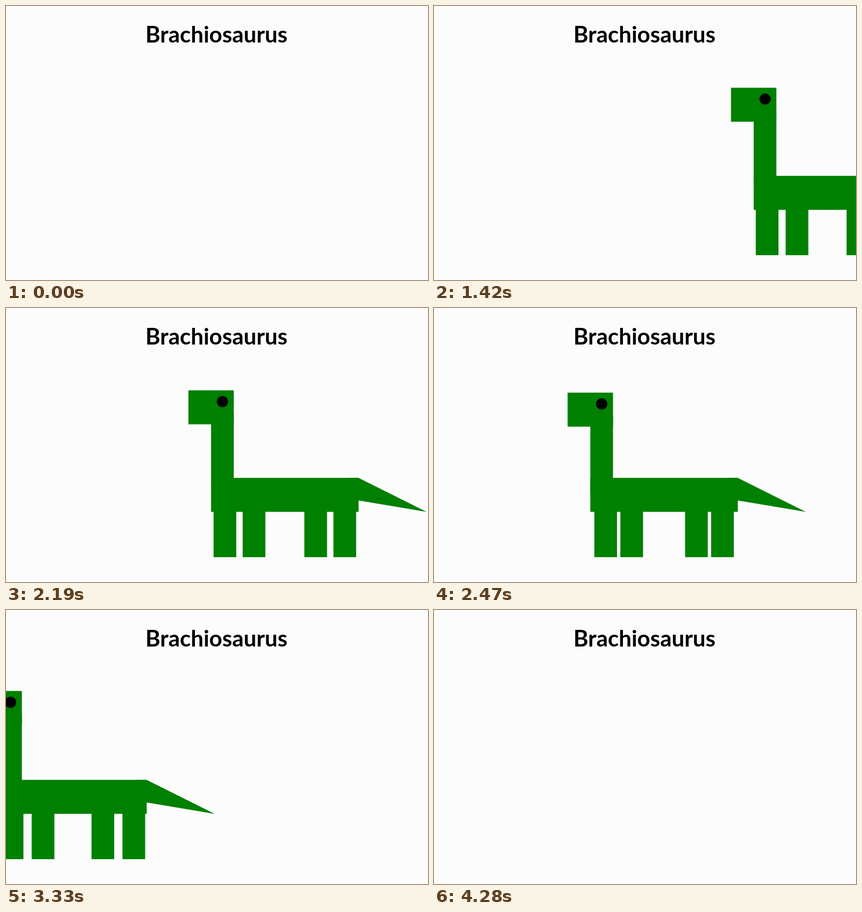
Write an HTML page with a canvas that moves like this. It is 784 px wide and 510 px high and loops after 4560 ms.

```html
<!DOCTYPE html>
<html lang="en">
<head>
<meta charset="utf-8">
<title>Brachiosaurus</title>
<style>
  html, body { margin: 0; width: 100%; height: 100%; overflow: hidden; background: #fcfcfc; }
  canvas { display: block; }
</style>
</head>
<body>
<canvas id="stage" width="784" height="510"></canvas>
<script>
const ctx = document.getElementById('stage').getContext('2d');
const LOOP = 4560;
const STEP = 95;   // the picture advances in steps of this many ms
const U = 21.08;   // body unit, all parts are multiples of it

// cubic-bezier(.42, 0, 1, 1), solved with Newton's method
function easeIn(p) {
  let s = p;
  for (let i = 0; i < 6; i++) {
    const err = ((-0.74 * s + 0.48) * s + 1.26) * s - p;
    s -= err / (1.26 + 0.96 * s - 2.22 * s * s + 0.001);
  }
  return s * s * (3 - 2 * s);
}

// Left edge of the head: one eased walk of five seconds, already under way at 0.
function walkX(t) {
  return 828 - 1374 * easeIn((t + 500) / 5000);
}

// Head bob and leg swing: 0 to 1 and back every 250 ms.
function gait(t) {
  const p = (t + 151) % 250 / 125;
  return p < 1 ? easeIn(p) : 1 - easeIn(p - 1);
}

function box(x, y, w, h) {
  ctx.fillRect(x, y, w * U, h * U);
}

function dinosaur(x, swing) {
  const head = (7 + swing / 2) * U;
  const stride = 0.8 + swing * U / 3;
  const body = x + 2 * U, back = 15 * U, rump = body + 13 * U;

  ctx.fillStyle = '#008000';
  box(x, head, 4, 3);
  box(body, head + 2 * U, 2, 7);
  box(body, back, 13, 3);
  for (const hip of [0, 8 * U]) {
    box(body + hip + stride, 17 * U, 2, 5);
    box(body + hip + 3 * U - stride, 17 * U, 2, 5);
  }

  // The tail starts inside the body so that no seam shows.
  ctx.beginPath();
  ctx.moveTo(rump - U, back);
  ctx.lineTo(rump, back);
  ctx.lineTo(rump + 6 * U, back + 3 * U);
  ctx.lineTo(rump, back + 2 * U);
  ctx.lineTo(rump - U, back + 2 * U);
  ctx.fill();

  ctx.fillStyle = '#000';
  ctx.beginPath();
  ctx.arc(x + 3 * U, head + U, U / 2, 0, 2 * Math.PI);
  ctx.fill();
}

function draw(time) {
  ctx.fillStyle = '#fcfcfc';
  ctx.fillRect(0, 0, 784, 510);

  ctx.fillStyle = '#000';
  ctx.font = '700 42px Lato, "Open Sans", sans-serif';
  ctx.textAlign = 'center';
  ctx.fillText('Brachiosaurus', 391, 68);

  const t = 2 * STEP + STEP * Math.floor((time - 185) / STEP);
  dinosaur(walkX(t), gait(t));
}

const start = performance.now();
function frame() {
  draw((performance.now() - start) % LOOP);
  requestAnimationFrame(frame);
}
frame();
</script>
</body>
</html>
```
